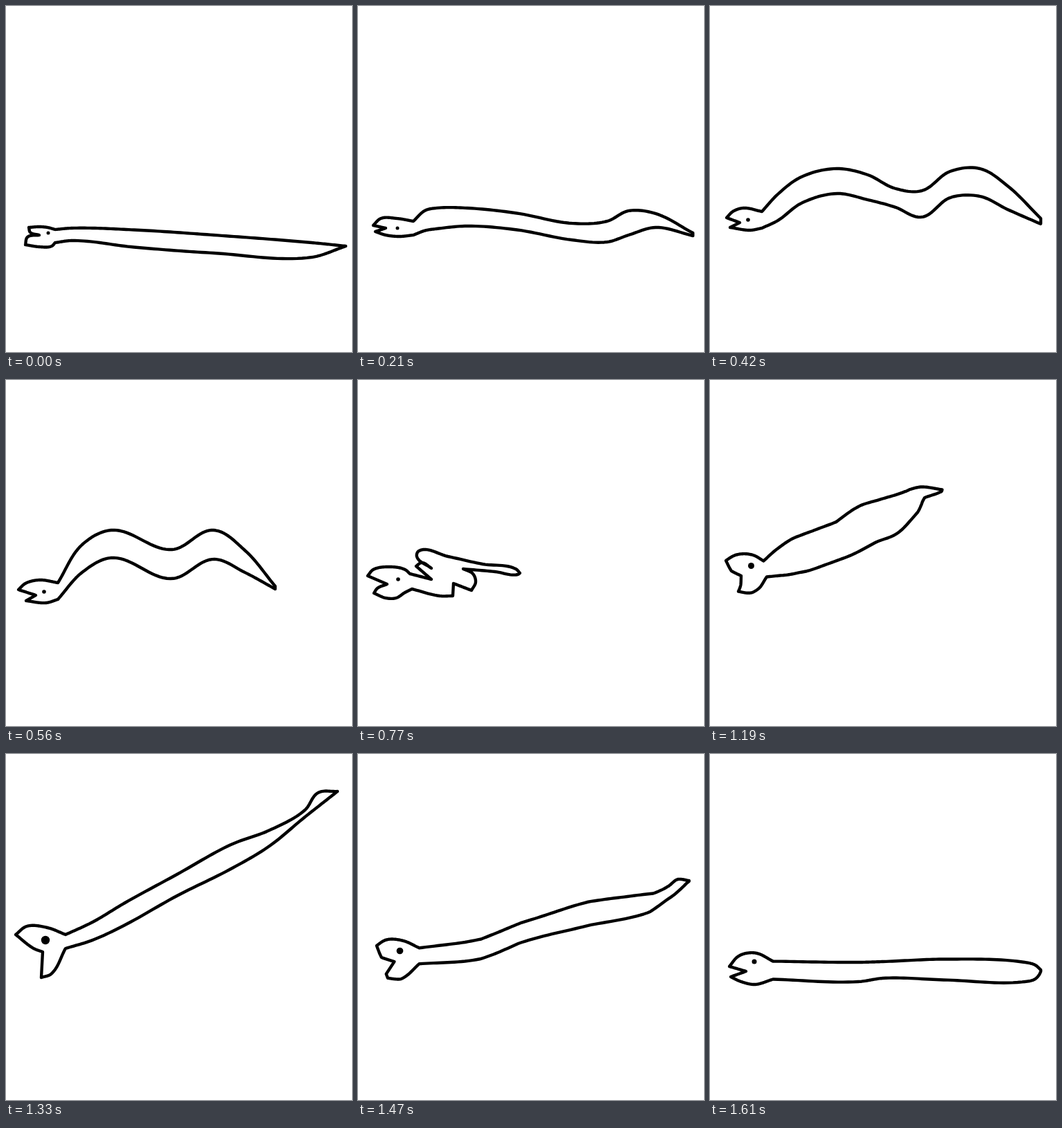
Write an HTML page with a canvas that moves like this. It is 500 px wide and 500 px high and loops after 1.68 s.

```html
<!DOCTYPE html>
<html lang="en">
<head>
<meta charset="utf-8">
<title>Stretching worm</title>
<style>
html, body { margin: 0; height: 100%; overflow: hidden; background: #fff; }
canvas { display: block; }
</style>
</head>
<body>
<canvas id="stage" width="500" height="500"></canvas>
<script>
const ctx = document.getElementById('stage').getContext('2d');
const STEP = 70, STEPS = 24, SAMPLES = 120;

const tuples = text => text.split(' ').map(t => t.split(',').map(Number));
const mix = (a, b, k) => a.map((v, i) => v + (b[i] - v) * k);
const poses = [];

// Head: upper and lower run from the mouth corner to the neck and back.
function addPose(at, eye, upper, lower, back, belly) {
  const top = tuples(upper), jaw = tuples(lower);
  const parts = [
    [...top, back[0]],
    back,
    [back.at(-1), ...belly],
    [belly.at(-1), ...jaw, top[0]]
  ];
  poses.push({ at, eye, points: parts.flatMap(smooth) });
}

// A worm body is a spine of x, y and half thickness.
function addWorm(at, eye, upper, lower, spine) {
  const ribs = tuples(spine);
  addPose(at, eye, upper, lower,
    ribs.map(([x, y, h]) => [x, y - h]),
    ribs.map(([x, y, h]) => [x, y + h]).reverse());
}

// Samples a curve through key points; turns sharper than a right angle stay corners.
function smooth(keys) {
  const segments = keys.slice(1).map(([x, y], i) => {
    const dx = x - keys[i][0], dy = y - keys[i][1], length = Math.hypot(dx, dy) || 1;
    return { length, dir: [dx / length, dy / length] };
  });
  const tangent = (i, own) => {
    const a = segments[i - 1], b = segments[i];
    if (!a || !b || a.dir[0] * b.dir[0] + a.dir[1] * b.dir[1] < 0.1) return own;
    const sum = [a.dir[0] + b.dir[0], a.dir[1] + b.dir[1]];
    return sum.map(v => v / Math.hypot(...sum));
  };
  return Array.from({ length: SAMPLES + 1 }, (_, n) => {
    const f = n / SAMPLES * segments.length;
    const i = Math.min(Math.floor(f), segments.length - 1);
    const u = f - i, v = 1 - u, { length, dir } = segments[i];
    const from = tangent(i, dir), to = tangent(i + 1, dir);
    return [0, 1].map(c => {
      const p = keys[i][c], q = keys[i + 1][c];
      return v * v * v * p + 3 * v * v * u * (p + from[c] * length / 3)
        + 3 * v * u * u * (q - to[c] * length / 3) + u * u * u * q;
    });
  });
}

addWorm(0, [61, 328, 2.5], '48,331 35,327 33,320 48,319 60,320', '66,347 48,348 28,345 31,334',
  '71,332.5,9.5 95,330,9 185,336,12.5 300,344,13 442,352.5,10.5 491,347,0');
addWorm(3, [57, 321, 2.5], '40,321 22,317 33,307 56,307', '60,333 40,331 25,326',
  '80,321,10 97,310,14.5 113,307,15 158,305,13 230,311.5,12 309,326,12 360,326,15 391,313.5,17.5 430,310,10 484,330,2');
addWorm(6, [55, 309, 2.8], '43,313 24,306 33,297 48,292', '58,324 29,320',
  '75,309,12 98,291,19 132,266,19 183,253,18 228,262,18 267,277,13.5 306,286,19 347,258,19 390,255,20 430,277,17 478,311,4');
addWorm(8, [55, 306, 2.8], '43,311 18,303 28,294 48,289', '58,322 29,319',
  '75,305,12 110,258,20 152,237,20 240,266,21 300,238,21 345,262,16 389,300,2');

// Curled up: limbs and tail bulge out of the outline.
addPose(11, [58, 288, 2.8], '42,295 14,283 22,274 45,270 68,274', '68,307 55,315 40,315 23,308 28,301',
  tuples('75,280 106,288 84,269 92,264 106,272 85,255 88,247 130,255 180,266 228,273 234,279'),
  tuples('231,281 198,277 152,273 166,280 170,292 164,304 138,294 137,312 118,312 78,302'));
addPose(15, [62, 268, 2.8], '37,280 22,271 32,261 47,256 64,255', '70,294 50,296 28,289 37,284',
  tuples('69,262 72,245 80,235 94,238 102,245 102,236 113,233 125,237 137,246 165,255 192,263'),
  tuples('190,268 159,272 167,281 168,296 165,307 149,306 142,311 122,308 103,301 93,293 78,288'));

addWorm(19, [57, 269, 6.2], '53,286 40,281 14,261 30,249 60,251', '65,318 51,323',
  '86,271,10 125,256,13 172,231,16 247,189.5,15.5 325,148.5,17.5 380,122,11.5 432,86,5 451,66,10 479,54,0');
addWorm(23, [64, 300, 3.5], '52,314 28,307 40,293 52,288 68,288', '65,333 45,329 30,322',
  '91,312.5,13 215,315,14 250,312,12 340,311.5,15 455,315,14 470,315,10 478,313,1');

function draw(step) {
  const next = Math.max(1, poses.findIndex(p => p.at >= step));
  const a = poses[next - 1], b = poses[next];
  const k = (step - a.at) / (b.at - a.at);

  ctx.clearRect(0, 0, 500, 500);
  ctx.lineWidth = 4.4;
  ctx.lineJoin = 'round';

  ctx.beginPath();
  a.points.forEach((p, i) => ctx.lineTo(...mix(p, b.points[i], k)));
  ctx.closePath();
  ctx.stroke();

  ctx.beginPath();
  ctx.arc(...mix(a.eye, b.eye, k), 0, Math.PI * 2);
  ctx.fill();
}

const start = performance.now();
function tick() {
  draw(Math.floor((performance.now() - start) / STEP) % STEPS);
  requestAnimationFrame(tick);
}
tick();
</script>
</body>
</html>
```
